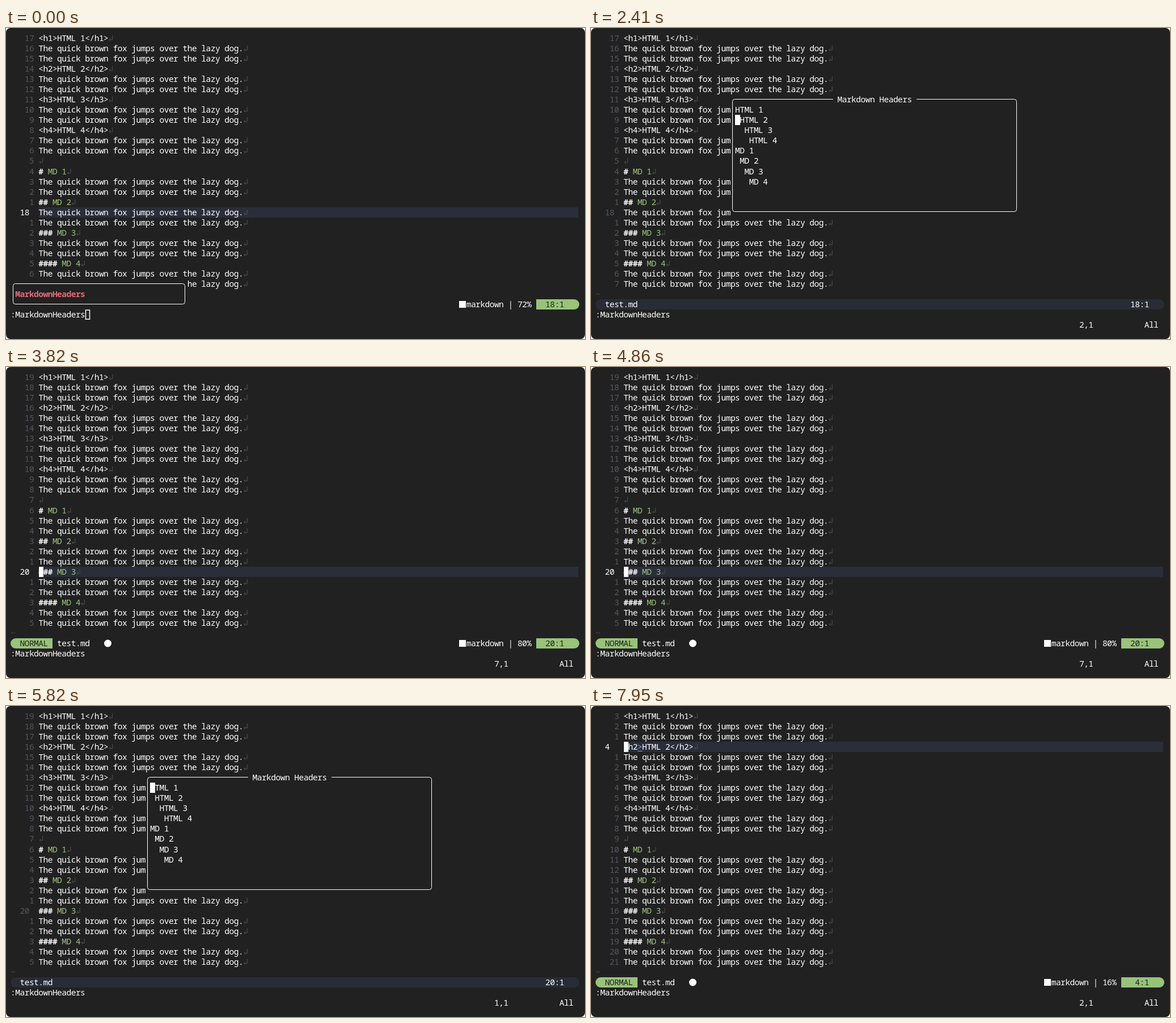
An HTML page with a canvas for the animation above (8 s loop, 1021 px wide and 548 px high).

```html
<!DOCTYPE html>
<html lang="en">
<head>
<meta charset="utf-8">
<title>Markdown headers</title>
<style>
  html, body { margin: 0; width: 100%; height: 100%; overflow: hidden; background: #fff; }
  canvas { display: block; }
</style>
</head>
<body>
<canvas id="stage" width="1021" height="548"></canvas>
<script>
const ctx = document.getElementById('stage').getContext('2d');
const CELL = 8.2, ROW = 18.04, LEFT = 8.4, TOP = 9;
const BG = '#212121', WHITE = '#fff', DIM = '#555762', EOL = '#4a4a4a',
      LINE = '#2a2e3a', BAR = '#282c35', GREEN = '#98c379', RED = '#e06c75', BLUE = '#61afef';
const MONO = '14.6px "Noto Sans Mono", "DejaVu Sans Mono", monospace';
const ARROW = '15px "DejaVu Sans Mono", monospace';
const COMMAND = 'MarkdownHeaders';
const LOOP = 8000;

const fox = 'The quick brown fox jumps over the lazy dog.';
const levels = [1, 2, 3, 4];
const lines = [
  ...levels.flatMap(n => [`<h${n}>HTML ${n}</h${n}>`, fox, fox]),
  '',
  ...levels.flatMap(n => ['#'.repeat(n) + ` MD ${n}`, fox, fox]),
];
const headers = ['HTML', 'MD'].flatMap(kind => levels.map(n => ' '.repeat(n - 1) + `${kind} ${n}`));

// Each step: start time, mode, current line, selected header
const steps = [
  [0, 'command', 18], [1570, 'list', 18, 1],
  [2090, 'list', 18, 2], [2640, 'list', 18, 3], [2860, 'list', 18, 4],
  [3050, 'list', 18, 5], [3160, 'list', 18, 6], [3270, 'list', 18, 7],
  [3820, 'normal', 20, 7], [5000, 'command', 20],
  [5800, 'list', 20, 1], [6140, 'list', 20, 2], [7180, 'normal', 4, 2],
];
const FOCUS_AT = 400;

const px = col => LEFT + col * CELL;
const py = row => TOP + row * ROW;

// Text sits centred in its grid cells
function text(str, col, row, color = WHITE, weight = 400, font = MONO) {
  ctx.font = `${weight} ${font}`;
  ctx.letterSpacing = '0px';
  const gap = CELL - ctx.measureText('0').width;
  ctx.letterSpacing = `${gap}px`;
  ctx.fillStyle = color;
  ctx.fillText(str, px(col) + gap / 2, Math.round(py(row) + 14));
}

function fill(col, row, cols, rows, color, radii = 0) {
  const x = Math.round(px(col)), y = Math.round(py(row));
  ctx.fillStyle = color;
  ctx.beginPath();
  ctx.roundRect(x, y, Math.round(px(col + cols)) - x, Math.round(py(row + rows)) - y, radii);
  ctx.fill();
}

function frame(col, row, cols, rows) {
  const snapX = c => Math.floor(px(c) - .4) + .5;
  const snapY = r => Math.floor(py(r) - .9) + .5;
  const x = snapX(col + .5), y = snapY(row + .5);
  fill(col, row, cols, rows, BG);
  ctx.strokeStyle = WHITE;
  ctx.lineWidth = 1;
  ctx.beginPath();
  ctx.roundRect(x, y, snapX(col + cols - .5) - x, snapY(row + rows - .5) - y, 4);
  ctx.stroke();
}

function cursor(col, row, hollow) {
  if (!hollow) return fill(col, row, 1, 1, WHITE);
  ctx.strokeStyle = WHITE;
  ctx.lineWidth = 1.5;
  ctx.strokeRect(px(col) + .9, py(row) + .9, CELL - 1.2, ROW - 1.8);
}

function drawLine(str, row, current, mode) {
  const offset = Math.abs(row + 1 - current);
  const active = !offset && mode !== 'list';
  if (active) fill(6, row, 116, 1, LINE);
  if (offset) text(String(offset).padStart(3), 2, row, DIM);
  else text(String(current), 2, row, active ? WHITE : DIM);

  const hashes = str.match(/^#*/)[0];
  if (hashes) {
    text(hashes, 6, row, WHITE, 600);
    text(str.slice(hashes.length), 6 + hashes.length, row, GREEN);
  } else if (active && mode === 'normal' && str[0] === '<') {
    text(str.slice(0, 3), 6, row);
    text('>', 9, row, BLUE);
    ctx.fillRect(px(9), Math.round(py(row) + 15.5), CELL, 1);
    text(str.slice(4), 10, row);
  } else {
    text(str, 6, row);
  }
  text('↲', 6 + str.length, row, EOL, 400, ARROW);
}

function drawStatus(current, mode) {
  const place = `${current}:1`.padStart(4);
  if (mode === 'list') {
    fill(0, 26, 122.3, 1, BAR, 9);
    text('test.md', 2, 26);
    text(place, 115, 26);
    return;
  }
  fill(0, 26, 9, 1, GREEN, [9, 0, 0, 9]);
  text('NORMAL', 2, 26, BG);
  text('test.md', 10, 26);
  ctx.fillStyle = WHITE;
  ctx.beginPath();
  ctx.arc(179.5, 487, 6.5, 0, 7);
  ctx.fill();
  ctx.fillRect(799, 481, 12, 12);
  text(`markdown | ${current * 100 / lines.length}%`, 98, 26);
  fill(113, 26, 9.3, 1, GREEN, [0, 9, 9, 0]);
  text(place, 115, 26, BG);
}

function drawList(selected) {
  frame(29, 6, 62, 12);
  fill(51, 6, 18, 1, BG);
  text('Markdown Headers', 52, 6);
  headers.forEach((header, i) => text(header, 30, 7 + i));
  cursor(30, 6 + selected);
}

function draw(now) {
  const t = now % LOOP;
  const [, mode, current, selected] = steps.findLast(step => step[0] <= t);

  ctx.clearRect(0, 0, 1021, 548);
  ctx.fillStyle = BG;
  ctx.beginPath();
  ctx.roundRect(0, 0, 1021, 548, 8);
  ctx.fill();

  lines.forEach((str, row) => drawLine(str, row, current, mode));
  text('~', 0, 25, EOL);
  drawStatus(current, mode);
  text(':' + COMMAND, 0, 27);

  if (mode === 'command') {
    frame(0, 24, 38, 3);
    text(COMMAND, 1, 25, RED, 700);
    cursor(16, 27, t < FOCUS_AT);
  } else {
    text(`${selected},1`, 104, 28);
    text('All', 118, 28);
    if (mode === 'list') drawList(selected);
    else cursor(6, current - 1);
  }
}

const start = performance.now();
function tick() {
  draw(performance.now() - start);
  requestAnimationFrame(tick);
}
tick();
</script>
</body>
</html>
```
